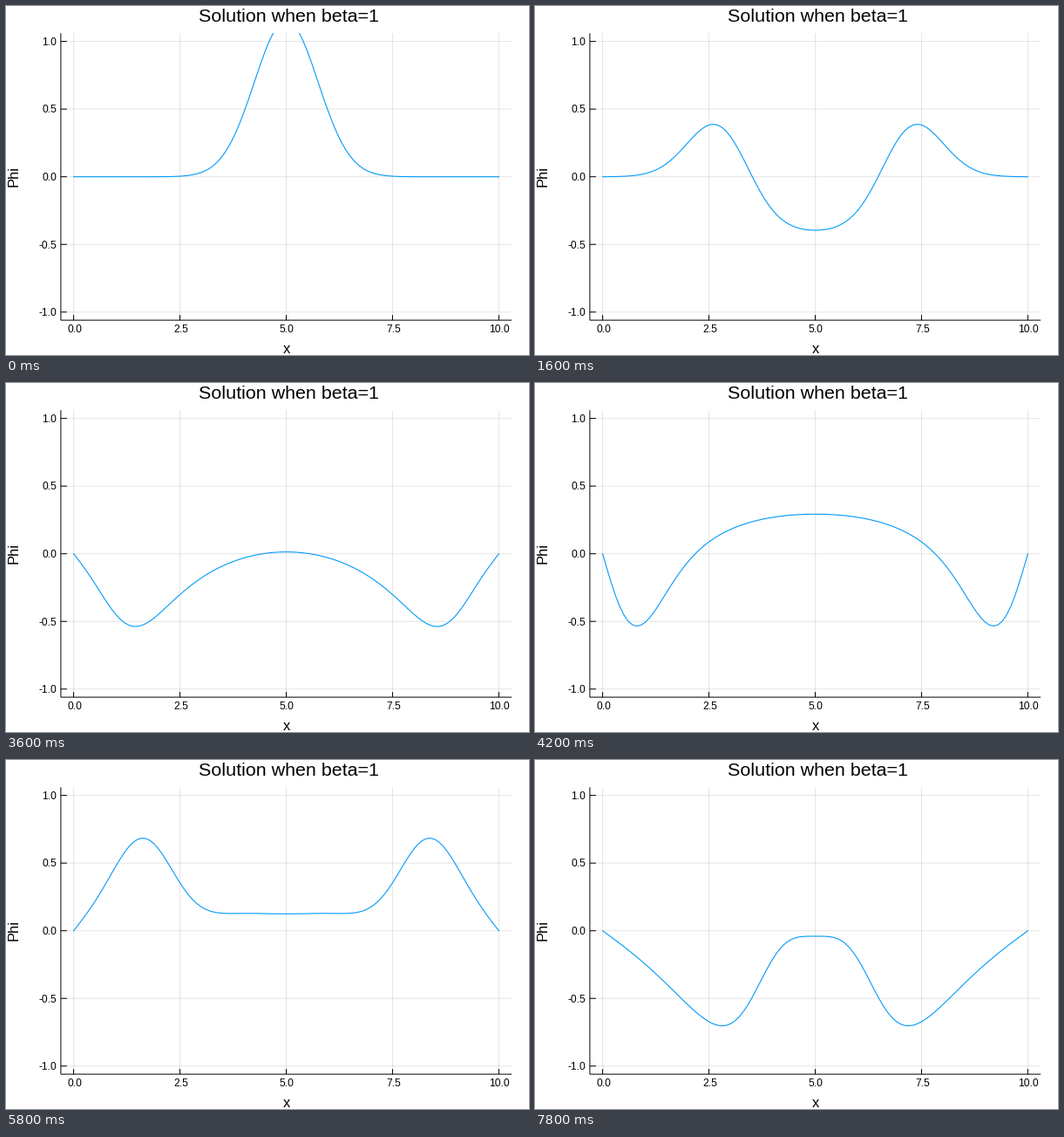
A matplotlib script that plays this animation: 600 by 400 pixels, repeating every 8 s.

```python
import numpy as np
import matplotlib.pyplot as plt
from matplotlib.animation import FuncAnimation
from matplotlib.patches import Rectangle

W, H, DPI = 600, 400, 100
FRAMES, INTERVAL = 40, 200
LEFT, RIGHT, TOP, BOTTOM = 62.9, 580.1, 31.2, 360.1
FONT = "Liberation Sans"

# Klein-Gordon equation on [0, 10] with fixed ends: central differences
# in space, explicit Euler steps in time, worked out per sine mode
L, BETA = 10.0, 1.0
DX, DT = 0.1, 0.005
FIRST_STEP, STEPS = 51, 50

x = np.linspace(0, L, int(L / DX) + 1)
k = np.arange(1, 26, 2) * np.pi / L
modes = np.sin(np.outer(x, k))
pulse = np.exp(-(x - L / 2) ** 2)
amp = 2 / L * DX * (pulse @ modes)
omega = np.sqrt((np.sin(k * DX) / DX) ** 2 + BETA)
# the starting speed equals the starting height
start = amp * (1 - 1j / omega)
growth = 1 + 1j * omega * DT


def phi(step):
    return modes @ (start * growth ** step).real


def px(v):
    return 77.6 + 48.78 * np.asarray(v)


def py(v):
    return 195.7 - 155.1 * np.asarray(v)


def pt(pixels):
    return pixels * 72 / DPI


fig = plt.figure(figsize=(W / DPI, H / DPI), dpi=DPI, facecolor="white")
ax = fig.add_axes([0, 0, 1, 1])
ax.set_xlim(0, W)
ax.set_ylim(H, 0)
ax.axis("off")


def rule(x0, y0, x1, y1, **style):
    ax.plot([x0, x1], [y0, y1], color="black", lw=pt(1),
            solid_capstyle="butt", snap=False, **style)


def label(x0, y0, s, size, ha="center", **style):
    ax.text(x0, y0, s, fontsize=pt(size), family=FONT, color="black",
            ha=ha, va="baseline", **style)


for v in (0, 2.5, 5, 7.5, 10):
    p = px(v)
    rule(p, TOP, p, BOTTOM, alpha=0.1)
    rule(p, BOTTOM, p, BOTTOM - 6)
    label(p + 0.9, 374.5, f"{v:.1f}", 12)
for v in (-1, -0.5, 0, 0.5, 1):
    p = py(v)
    rule(LEFT, p, RIGHT, p, alpha=0.1)
    rule(LEFT, p, LEFT + 7, p)
    label(58, p + 4.3, f"{v:.1f}", 12, ha="right")

rule(LEFT, TOP, LEFT, BOTTOM)
rule(LEFT, BOTTOM, RIGHT, BOTTOM)
label(324, 18, "Solution when beta=1", 21.5)
label(321.8, 398, "x", 16.5)
label(14, 195, "Phi", 16.5, rotation=90, rotation_mode="anchor")

curve, = ax.plot([], [], color="#009AF9", lw=pt(1.1), zorder=3, snap=False)
frame_box = Rectangle((LEFT, TOP), RIGHT - LEFT, BOTTOM - TOP,
                      transform=ax.transData)
curve.set_clip_path(frame_box)


def draw(i):
    curve.set_data(px(x), py(phi(FIRST_STEP + STEPS * i)))
    return curve,


anim = FuncAnimation(fig, draw, frames=FRAMES, interval=INTERVAL,
                     repeat=True, repeat_delay=0)
plt.show()
```
